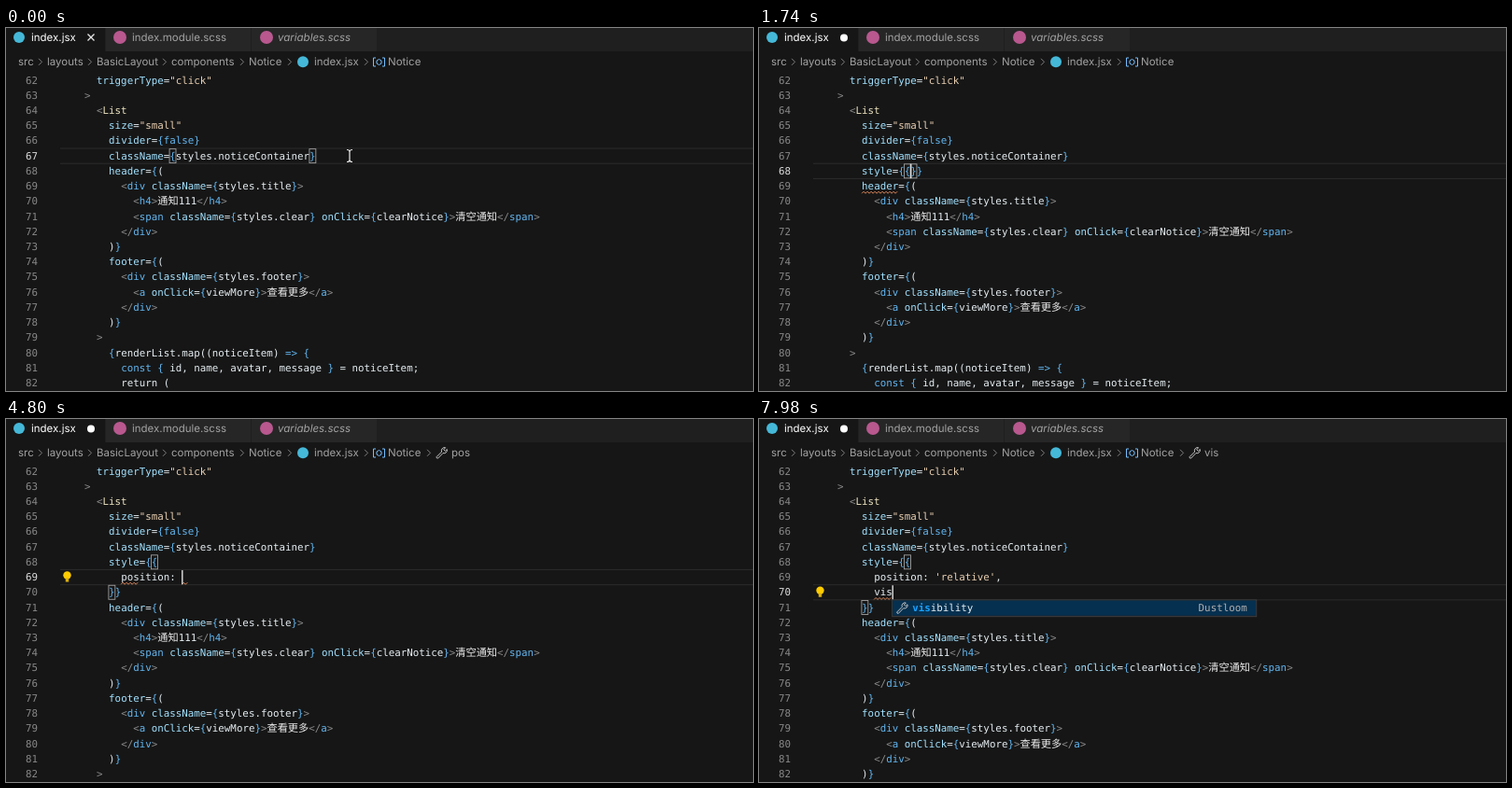
An HTML page for the animation above (8000 ms loop, 800 by 389 pixels).

```html
<!DOCTYPE html>
<html lang="en">
<head>
<meta charset="utf-8">
<title>Editor</title>
<style>
  html, body { margin: 0; width: 100%; height: 100%; overflow: hidden; background: #161616; }
  svg { display: block; width: 100vw; height: 100vh; }
  text { white-space: pre; text-rendering: geometricPrecision; }
  .code { font: 10.82px "DejaVu Sans Mono", "Noto Sans CJK SC", "Noto Sans CJK", monospace; fill: #e6eef2; }
  .cjk { font-size: 11.2px; font-family: "Noto Sans CJK SC", "Noto Sans CJK", sans-serif; fill: #ececec; }
  .ui { font: 11.5px Inter, "Liberation Sans", sans-serif; fill: #a2a2a2; }
  .slant { font-style: italic; }
  .punct { fill: #8a8a8a; }
  .tag, .brace, .word { fill: #62b6f0; }
  .comp { fill: #ece3c0; }
  .attr { fill: #a2e2ff; }
  .str { fill: #e8cfb2; }
  .hit { fill: #18a3ff; font-weight: bold; }
  .line { fill: none; stroke: #c5c5c5; }
</style>
</head>
<body>
<svg id="stage" viewBox="0 0 800 389" preserveAspectRatio="none"></svg>
<script>
const LOOP = 8000, FIRST = 62, CW = 6.515, LH = 16.22;
const colX = c => 58 + c * CW;
const rowY = n => 56 + (n - FIRST) * LH;

const HEAD = [
  '      triggerType="click"',
  '    >',
  '      <List',
  '        size="small"',
  '        divider={false}',
  '        className={styles.noticeContainer}'
];
const TAIL = [
  '        header={(',
  '          <div className={styles.title}>',
  '            <h4>通知111</h4>',
  '            <span className={styles.clear} onClick={clearNotice}>清空通知</span>',
  '          </div>',
  '        )}',
  '        footer={(',
  '          <div className={styles.footer}>',
  '            <a onClick={viewMore}>查看更多</a>',
  '          </div>',
  '        )}',
  '      >',
  '        {renderList.map((noticeItem) => {',
  '          const { id, name, avatar, message } = noticeItem;',
  '          return ('
];

// Suggestion entries: name|detail, a leading # marks a snippet
const S_LIST = ['#scu|shouldComponentUpdate', '#set|propertySet', '#setInterval|setInterval',
  '#setTimeout|setTimeout', '#share|share', '#shouldComponentUpdate|shouldComponentUpdate',
  '#setinterval|Set Interval Function', '#settimeout|Set Timeout Function',
  '#switch|Switch Statement', '#getSnapshotBeforeUpdate|getSnapshotBeforeUpdate',
  '#useState|useState', '#import statement|Import external module.', 'style|Dustloom'];
const PO_LIST = ['pointerEvents|Dustloom', 'position', 'paintOrder', '#prom|promise', '#promise|promise',
  'perspectiveOrigin', 'placeContent', 'paddingBottom', 'paddingTop', 'paddingBlock',
  'paddingBlockEnd', 'paddingBlockStart'];
const POS_LIST = ['position|Dustloom', 'paddingBlockStart', 'maskPosition', 'objectPosition',
  'offsetPosition', 'listStylePosition', 'backgroundPosition', 'backgroundPositionX'];
const RE_LIST = ['relative|Dustloom', '#return|return', '#reduce|reduce', '#render|render',
  '#replace|replace', '#require|require', '#resolve|resolve', '#reverse|reverse', '#request|request'];
const VIS_LIST = ['visibility|Dustloom'];

const I8 = ' '.repeat(8), I10 = ' '.repeat(10);
const style = (...body) => [I8 + 'style={{', ...body.map(s => I10 + s), I8 + '}}'];
const pop = (list, query, col, bar) => ({ list, query, col, bar });
const REL = "position: 'relative',";
const JSX_ENDS = [[64, 6], [80, 6]];
const header = [[69, 8, 14]];
const block = end => [[68, 15], [end, 8]];
const pos = [[69, 10, 13]];
const typed = (word, list, at) => ({
  ins: [I8 + word], row: 68, col: 8 + word.length, boxes: JSX_ENDS,
  marks: word.length < 5 ? 'all' : header, pop: list && pop(list, word, at)
});
const prop = (body, col, extra) => ({ ins: style(body), row: 69, col, boxes: block(70), ...extra });
const prop2 = (body, extra) => ({ ins: style(REL, body), row: 70, col: 10 + body.length, boxes: block(71), ...extra });

const STEPS = [
  [0, { ins: [], row: 67, col: -1, boxes: [[67, 18], [67, 41]], clean: true }],
  [60, { ins: [''], row: 68, col: 8 }],
  [360, typed('s', S_LIST, 9)],
  [540, typed('st', S_LIST, 9)],
  [660, typed('sty', S_LIST, 9)],
  [780, typed('styl', S_LIST, 9)],
  [840, typed('style')],
  [900, typed('style', S_LIST, 13)],
  [1500, { ins: [I8 + 'style={}'], row: 68, col: 15, boxes: [[68, 14], [68, 15]], marks: header }],
  [1740, { ins: [I8 + 'style={{}}'], row: 68, col: 16, boxes: [[68, 15], [68, 16]], marks: header }],
  [2100, prop('', 10)],
  [2520, prop('p', 11, { marks: [[69, 10, 11]] })],
  [2700, prop('po', 12, { marks: [[69, 10, 12]], bulb: 1, crumb: 'po', pop: pop(PO_LIST, 'po', 12, true) })],
  [3180, prop('pos', 13, { marks: pos, bulb: 1, crumb: 'pos', pop: pop(POS_LIST, 'pos', 12) })],
  [4020, prop('pos', 13, { marks: pos, bulb: 1, crumb: 'pos', pop: pop(POS_LIST, 'pos', 13) })],
  [4800, prop('position: ', 20, { marks: [...pos, [69, 20, 21]], bulb: 1, crumb: 'pos' })],
  [5040, prop("position: ''", 21, { bulb: 1, crumb: 'pos' })],
  [5280, prop("position: 'r'", 22, { bulb: 1, crumb: 'position' })],
  [5400, prop("position: 're'", 23, { bulb: 1, crumb: 'position', pop: pop(RE_LIST, 're', 23) })],
  [5880, prop("position: 'relative'", 29, { crumb: 'position' })],
  [6120, prop("position: 'relative'", 30, { crumb: 'position' })],
  [6240, prop(REL, 31)],
  [6540, prop2('')],
  [7380, prop2('v')],
  [7500, prop2('vi', { marks: [[70, 10, 12]] })],
  [7560, prop2('vis', { marks: [[70, 10, 13]] })],
  [7620, prop2('vis', { marks: [[70, 10, 13]], pop: pop(VIS_LIST, 'vis', 13) })],
  [7920, prop2('vis', { marks: [[70, 10, 13]], bulb: 1, crumb: 'vis', pop: pop(VIS_LIST, 'vis', 13) })]
];

const esc = s => s.replace(/&/g, '&amp;').replace(/</g, '&lt;').replace(/>/g, '&gt;');
const span = (cls, s) => cls ? `<tspan class="${cls}">${esc(s)}</tspan>` : esc(s);
const text = (x, y, s, cls, attrs = '') => `<text x="${x}" y="${y}" class="${cls}" ${attrs}>${s}</text>`;
const rect = (x, y, w, h, fill, attrs = '') =>
  `<rect x="${x}" y="${y}" width="${w}" height="${h}" fill="${fill}" ${attrs}/>`;
const disc = (x, y, r, fill) => `<circle cx="${x}" cy="${y}" r="${r}" fill="${fill}"/>`;
const stroke = (d, attrs = '') => `<path class="line" d="${d}" ${attrs}/>`;

const TOKEN = /(<\/?)(\w+)|(=>)|([<>])|("[^"]*"|'[^']*'?)|(\w+(?==[{"]))|\b(const|false)\b|([{}])|([\u4e00-\u9fff]+)/g;
function paint(src) {
  let out = '', end = 0;
  for (const m of src.matchAll(TOKEN)) {
    out += esc(src.slice(end, m.index));
    end = m.index + m[0].length;
    if (m[1]) out += span('punct', m[1]) + span(/[A-Z]/.test(m[2]) ? 'comp' : 'tag', m[2]);
    else out += span(['word', 'punct', 'str', 'attr', 'word', 'brace', 'cjk'][m.slice(3).findIndex(Boolean)], m[0]);
  }
  return out + esc(src.slice(end));
}

function fuzzy(name, query) {
  const hits = [];
  let i = 0;
  for (const ch of query) {
    if (name[i] !== ch) {
      const up = name.indexOf(ch.toUpperCase(), i);
      i = up < 0 ? name.indexOf(ch, i) : up;
      if (i < 0) return null;
    }
    hits.push(i++);
  }
  return hits;
}

function wave(n, from, to) {
  const y = rowY(n) + 6.7, end = colX(to);
  let d = '', up = false;
  for (let x = colX(from); x <= end; x += 2) {
    d += `${d ? 'L' : 'M'}${x} ${y + (up ? -1 : 1)}`;
    up = !up;
  }
  return stroke(d, 'style="stroke:#e08a5c"');
}

const wrench = (x, y) =>
  stroke(`M${x + 1} ${y + 4.5}l5.6 -5.6a3.3 3.3 0 0 1 4 -4.4l-1.9 2.1 1.6 1.6 2 -1.9a3.3 3.3 0 0 1 -4.3 4l-5.4 5.6q-1.6 .3 -1.6 -1.4z`);
const chevron = x => stroke(`M${x - 2} 32.8l3.5 3.5-3.5 3.5`, 'style="stroke:#808080"');

function popup({ list, query, col, bar }, row) {
  const x = colX(col), top = rowY(row) + 8.2;
  const items = list.map(s => {
    const [name, detail = ''] = s.replace('#', '').split('|');
    return { name, detail, snippet: s[0] === '#', hits: fuzzy(name, query) };
  }).filter(o => o.hits).slice(0, 12);
  const h = items.length * LH + 1.5;
  let out = rect(x, top, 390, h, '#1e1e1f', 'stroke="#3f3f40"');
  items.forEach((o, i) => {
    const y = top + (i + .5) * LH + .4;
    if (!i) out += rect(x + .5, top + .5, 389, LH, '#06304f');
    out += o.snippet
      ? rect(x + 5.5, y - 5, 10.5, 10.5, 'none', 'stroke="#d0d0d0"')
      : wrench(x + 4, y);
    const label = [...o.name].map((c, k) => span(o.hits.includes(k) ? 'hit' : '', c)).join('');
    out += text(x + 21.5, y + 3.7, label, 'code');
    out += text(x + 380, y + 3.7, o.detail, 'code', 'text-anchor="end" style="fill:#b0b0b0"');
  });
  if (bar) out += rect(x + 380.5, top, 9.5, 149, '#484848', 'opacity=".85"');
  return out;
}

function chrome(s) {
  let out = rect(0, 0, 800, 25, '#1f1f1f') + rect(0, 0, 106, 25, '#161616') +
    rect(107, 0, 155, 25, '#262626') + rect(263, 0, 134, 25, '#262626');
  out += disc(14, 10, 6, '#45b8d8') + disc(122, 10, 7, '#b8588f') + disc(279, 10, 7, '#b8588f');
  out += text(27, 13.8, 'index.jsx', 'ui', 'style="fill:#fff"') +
    text(135, 13.8, 'index.module.scss', 'ui') +
    text(291, 13.8, 'variables.scss', 'ui slant');
  out += s.clean ? stroke('M87.5 6.5l7 7m0 -7l-7 7', 'style="stroke:#e8e8e8;stroke-width:1.3"') : disc(91, 10.5, 4, '#fff');
  const crumbs = [[13, 'src'], [44, 'layouts'], [97, 'BasicLayout'], [177, 'components'],
    [260, 'Notice'], [330, 'index.jsx'], [409, 'Notice']];
  out += crumbs.map(([x, name]) => text(x, 40.2, name, 'ui')).join('');
  out += [37, 90, 170, 253, 304, 386].map(chevron).join('') + disc(318, 36.2, 6, '#45b8d8');
  out += stroke('M396 32h-2.5v9h2.5M403 32h2.5v9h-2.5', 'style="stroke:#75beff"') +
    stroke('M397 35l2.5 -1.5 2.5 1.5v3l-2.5 1.5 -2.5 -1.5z', 'style="stroke:#75beff"');
  if (s.crumb) out += chevron(453) + wrench(460, 36.2) + text(477, 40.2, s.crumb, 'ui');
  return out;
}

const width = src => [...src].reduce((w, c) => w + (c > '\u2e80' ? 11.2 / CW : 1), 0);

function draw(s, caret) {
  const lines = [...HEAD, ...s.ins, ...TAIL].slice(0, 21);
  const y = rowY(s.row);
  let out = rect(0, 0, 800, 389, '#161616');
  out += rect(58, y - 8.6, 742, 1, '#2b2b2b') + rect(58, y + 7.6, 742, 1, '#2b2b2b');
  lines.forEach((src, i) => {
    const n = FIRST + i, base = rowY(n) + 3.6;
    out += text(34, base, n, 'code', `text-anchor="end" style="fill:${n === s.row ? '#dcdcdc' : '#888'}"`);
    const lead = src.search(/\S|$/);
    out += text(colX(lead), base, paint(src.slice(lead)), 'code');
  });
  for (const [n, c] of s.boxes || [])
    out += rect(colX(c) - .2, rowY(n) - 7.5, CW + .4, 15, 'none', 'stroke="#a0a0a0" stroke-width=".9"');
  const marks = s.marks === 'all'
    ? lines.slice(6, 13).map((src, i) => [68 + i, 0, width(src)])
    : s.marks || [];
  out += marks.map(m => wave(...m)).join('');
  if (s.bulb) out += disc(65.5, y - 2, 4.2, '#ffcc00') + rect(63.8, y + 1, 3.4, 4, '#d8ae10');
  if (s.col >= 0 && caret) out += rect(colX(s.col) - .2, y - 7.5, 1.4, 15.2, '#e0e0e0');
  if (s.clean) out += stroke('M365 130.5q3 0 3 2v9q0 2 -3 2M371 130.5q-3 0 -3 2M371 143.5q-3 0 -3 -2', 'style="stroke:#eee;stroke-width:1.2"');
  if (s.pop) out += popup(s.pop, s.row);
  return out + chrome(s);
}

const stage = document.getElementById('stage');
let shown = '';
function render(now) {
  const t = now % LOOP;
  let i = STEPS.length - 1;
  while (STEPS[i][0] > t) i--;
  const [start, state] = STEPS[i];
  const caret = (t - start) % 1000 < 500;
  const key = i + '/' + caret;
  if (key !== shown) {
    stage.innerHTML = draw(state, caret);
    shown = key;
  }
}

const origin = performance.now();
function tick() {
  render(performance.now() - origin);
  requestAnimationFrame(tick);
}
tick();
</script>
</body>
</html>
```
